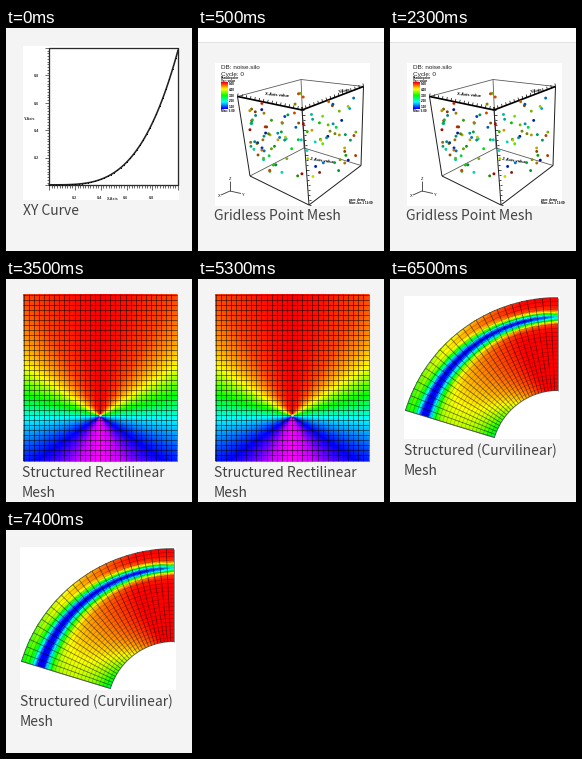
Recreate the animation shown at these times as a matplotlib script. Size 186 px wide and 223 px high, loop 8000 ms.

```python
import numpy as np
import matplotlib.pyplot as plt
from matplotlib.animation import FuncAnimation
from matplotlib.collections import LineCollection
from matplotlib.colors import hsv_to_rgb
from matplotlib.patches import Rectangle

W, H, DPI = 186, 223, 64
PT = 72 / DPI  # points per pixel
PAGE, INK = "#f4f4f4", "#444444"

fig = plt.figure(figsize=(W / DPI, H / DPI), dpi=DPI, facecolor=PAGE)


def make_scene():
    ax = fig.add_axes([0, 0, 1, 1])
    ax.axis("off")
    ax.set_autoscale_on(False)
    ax.set(xlim=(0, W), ylim=(H, 0))
    return ax


def box(ax, x0, y0, x1, y1, color, z=0):
    ax.add_patch(Rectangle((x0, y0), x1 - x0, y1 - y0, fc=color, lw=0, zorder=z,
                           antialiased=False))


def lines(ax, segments, width=1.0, color="black", alpha=1.0, z=3):
    ax.add_collection(LineCollection(segments, linewidths=width * PT, colors=color,
                                     alpha=alpha, zorder=z), autolim=False)


def label(ax, x, y, text, size, **kw):
    kw = {"family": "Liberation Sans", "color": "black", "va": "baseline", **kw}
    ax.text(x, y, text, fontsize=size * PT, zorder=6, **kw)


def caption(ax, x, y, *rows):
    for i, row in enumerate(rows):
        label(ax, x, y + 19.5 * i, row, 13.9, family="Noto Sans CJK JP", color=INK)


def rainbow(hue):
    """Hue in degrees to fully saturated RGB."""
    hue = np.clip(hue, 0, 300) / 360
    one = np.ones_like(hue)
    return hsv_to_rgb(np.stack([hue, one, one], axis=-1))


def draw_curve(ax):
    box(ax, 17, 18, 173, 172, "white")
    left, right, top, bottom = 43.3, 172, 20, 157.3
    lines(ax, [[(left, top), (right, top), (right, bottom), (left, bottom), (left, top)]],
          1.3, "#2a2a2a")
    u = np.linspace(0, 1, 120)
    x, y = left + (right - left) * u, bottom - 0.5 - 134.5 * u ** 3.5
    ax.plot(x, y, color="#222222", lw=1.6 * PT, zorder=4)
    ax.plot(x[::3], y[::3], ".", color="black", ms=2.2 * PT, mew=0, zorder=4)

    ticks = []
    for i in range(51):
        length = 5 if i % 10 == 0 else 3
        tx = left + (right - left) * i / 50
        ty = bottom + (top - bottom) * i / 50
        ticks.append([(tx, bottom), (tx, bottom + length)])
        ticks.append([(left - length + 1, ty), (left, ty)])
    lines(ax, ticks, 0.7, "#333333")
    small = dict(weight="bold", ha="center", color="#333333")
    for i in range(1, 5):
        text = f"0.{2 * i}"
        label(ax, 31, bottom - 27.4 * i + 1.5, text, 3.8, **small)
        label(ax, left + 25.7 * i - 1, 171, text, 3.8, **small)
    label(ax, 24, 92, "Y-Axis", 3.8, **small)
    label(ax, 107, 171.5, "X-Axis", 3.8, **small)
    caption(ax, 17, 187, "XY Curve")


def draw_points(ax):
    box(ax, 0, 0, W, 14, "white")
    box(ax, 0, 14, W, 15, "#e0e0e0")
    box(ax, 17, 35, 172, 178, "white")
    label(ax, 23, 41.3, "DB: noise.silo", 6.4, color="#222222")
    label(ax, 23, 47.6, "Cycle: 0", 6.4, color="#222222")
    label(ax, 23, 51, "Pseudocolor", 3, weight="bold")
    label(ax, 23, 53.6, "Var: value", 3, weight="bold")
    bar = rainbow(np.linspace(0, 240, 27))[:, None]
    ax.imshow(bar, extent=(23, 30, 81, 54), aspect="auto", zorder=2)
    for i in range(5):
        label(ax, 31, 57 + 5.8 * i, f"{5 - i}.00", 3, weight="bold")
    label(ax, 23, 84, "Max: 5.00", 3, weight="bold")

    near_l, back, near_r, front = (39.5, 68.5), (103, 51.5), (165.5, 58.5), (104, 82)
    low_l, low_b, low_r, low_f = (52, 148), (106, 120), (163, 137.5), (111, 177)
    lines(ax, [[near_l, back], [back, near_r], [back, low_b], [low_l, low_b],
               [low_b, low_r]], 0.8, "#555555", z=2)
    lines(ax, [[near_l, low_l], [low_l, low_f], [low_f, low_r], [low_r, near_r],
               [front, low_f]], 1, "#222222")
    lines(ax, [[near_l, front], [front, near_r]], 1.7)

    ticks = []
    for a, b, n, d in ((near_l, front, 16, (0.6, -3)), (front, near_r, 16, (-0.6, -3)),
                       (front, low_f, 20, (2.2, 0))):
        for s in np.linspace(0, 1, n):
            p = np.array(a) * (1 - s) + np.array(b) * s
            ticks.append([p, p + d])
    lines(ax, ticks, 0.7)
    label(ax, 67, 69.5, "X-Axis value", 4, weight="bold", rotation=-5)
    label(ax, 140, 65, "Y-Axis", 4, weight="bold", rotation=12)
    label(ax, 112, 135, "Z-Axis value", 4, weight="bold", rotation=-8)

    # Scatter the points between the upper and lower outline of the cube.
    rng = np.random.default_rng(11)
    count = 110
    x = rng.uniform(50, 158, count)
    upper = np.interp(x, [40, 104, 165], [76, 60, 68])
    lower = np.interp(x, [50, 108, 160], [136, 158, 134])
    y = upper + (lower - upper) * rng.beta(1.3, 1.3, count)
    colors = rainbow(rng.uniform(0, 240, count)) * rng.uniform(0.5, 0.9, (count, 1))
    ax.scatter(x, y, s=(2.9 * PT) ** 2, c=colors, marker="o", lw=0, zorder=5)

    hub = (32, 163)
    lines(ax, [[hub, (32, 153)], [hub, (23, 167)], [hub, (43, 165.5)]], 0.9, "#444444")
    for tx, ty, name in ((30.5, 152, "Z"), (19.5, 169, "X"), (44, 167.5, "Y")):
        label(ax, tx, ty, name, 4)
    label(ax, 151, 173, "user: demo", 3, weight="bold")
    label(ax, 151, 176.3, "Mon Jan 1 12:00", 3, weight="bold")
    caption(ax, 16, 192, "Gridless Point Mesh")


def draw_rectilinear(ax):
    x0, x1, y0, y1 = 17, 171, 15, 182
    cx, cy = 94, 137
    x, y = np.meshgrid(np.arange(x0, x1, 0.5) + 0.25, np.arange(y0, y1, 0.5) + 0.25)
    angle = np.degrees(np.arctan2(np.abs(x - cx), cy - y))
    hue = np.interp(angle, [0, 15, 32, 45, 56, 72, 92, 115, 135, 155, 180],
                    [0, 4, 16, 36, 58, 112, 180, 225, 256, 288, 300])
    ax.imshow(rainbow(hue), extent=(x0, x1, y1, y0), aspect="auto", zorder=1)
    xs = np.linspace(x0 + 0.5, x1 - 0.5, 31)
    ys = np.linspace(y0 + 0.5, y1 - 0.5, 34)
    lines(ax, [[(v, y0), (v, y1)] for v in xs] + [[(x0, v), (x1, v)] for v in ys],
          0.8, alpha=0.62)
    ax.plot(cx, cy - 1, "o", color="white", ms=2.6 * PT, mew=0, alpha=0.8, zorder=4)
    caption(ax, 15.5, 198, "Structured Rectilinear", "Mesh")


def draw_curvilinear(ax):
    box(ax, 14, 17, 170, 160, "white")
    cx, cy, r_in, r_out, r_band = 168, 178, 66.5, 159.5, 139.5
    start, sweep = np.radians(163), np.radians(73)

    def place(t, r):
        a = start - sweep * t
        return cx + r * np.cos(a), cy - r * np.sin(a)

    t, r = np.meshgrid(np.linspace(0, 1, 121), np.linspace(r_in, r_out, 141))
    inner = np.clip((r_band - r) / (r_band - r_in), 0, 1)
    outer = np.clip((r - r_band) / (r_out - r_band), 0, 1)
    base = 0.7 + 0.4 * t - (1 - t) * (0.3 * inner ** 5 + 0.22 * outer ** 4)
    width = 9 - 5 * t
    depth = np.interp(t, [0, 0.8, 0.93, 1], [0.66, 0.9, 0.8, 0.6])
    offset = (r - r_band) / width
    value = np.clip(base, 0, 1) - depth * np.exp(-offset ** 2) - 0.1 * np.exp(-(offset / 2) ** 2)
    colors = rainbow(np.clip(240 * (1 - value), 0, 240))
    x, y = place(t, r)
    ax.pcolormesh(x, y, colors[:-1, :-1], shading="flat", lw=0, antialiased=False, zorder=1)

    def arc(radius):
        return np.column_stack(place(np.linspace(0, 1, 60), radius))

    spokes = [[place(s, r_in), place(s, r_out)] for s in np.linspace(0, 1, 27)]
    lines(ax, spokes, 0.8, alpha=0.55)
    lines(ax, [arc(v) for v in np.linspace(r_in, r_out, 25)], 0.6, alpha=0.3)
    lines(ax, [arc(r_in), arc(r_out), spokes[0]], 0.9, "#555555", 0.8)
    caption(ax, 14, 176, "Structured (Curvilinear)", "Mesh")


scenes = []
for draw in (draw_curve, draw_points, draw_rectilinear, draw_curvilinear):
    scene = make_scene()
    draw(scene)
    scene.set(xlim=(0, W), ylim=(H, 0))
    scenes.append(scene)

STEP = 500
STARTS = [0, 500, 3500, 6500]  # ms at which each scene cuts in


def update(i):
    current = sum(i * STEP >= s for s in STARTS) - 1
    for k, ax in enumerate(scenes):
        ax.set_visible(k == current)
    return scenes


anim = FuncAnimation(fig, update, frames=8000 // STEP, interval=STEP, repeat=True,
                     repeat_delay=0, blit=False)
plt.show()
```
